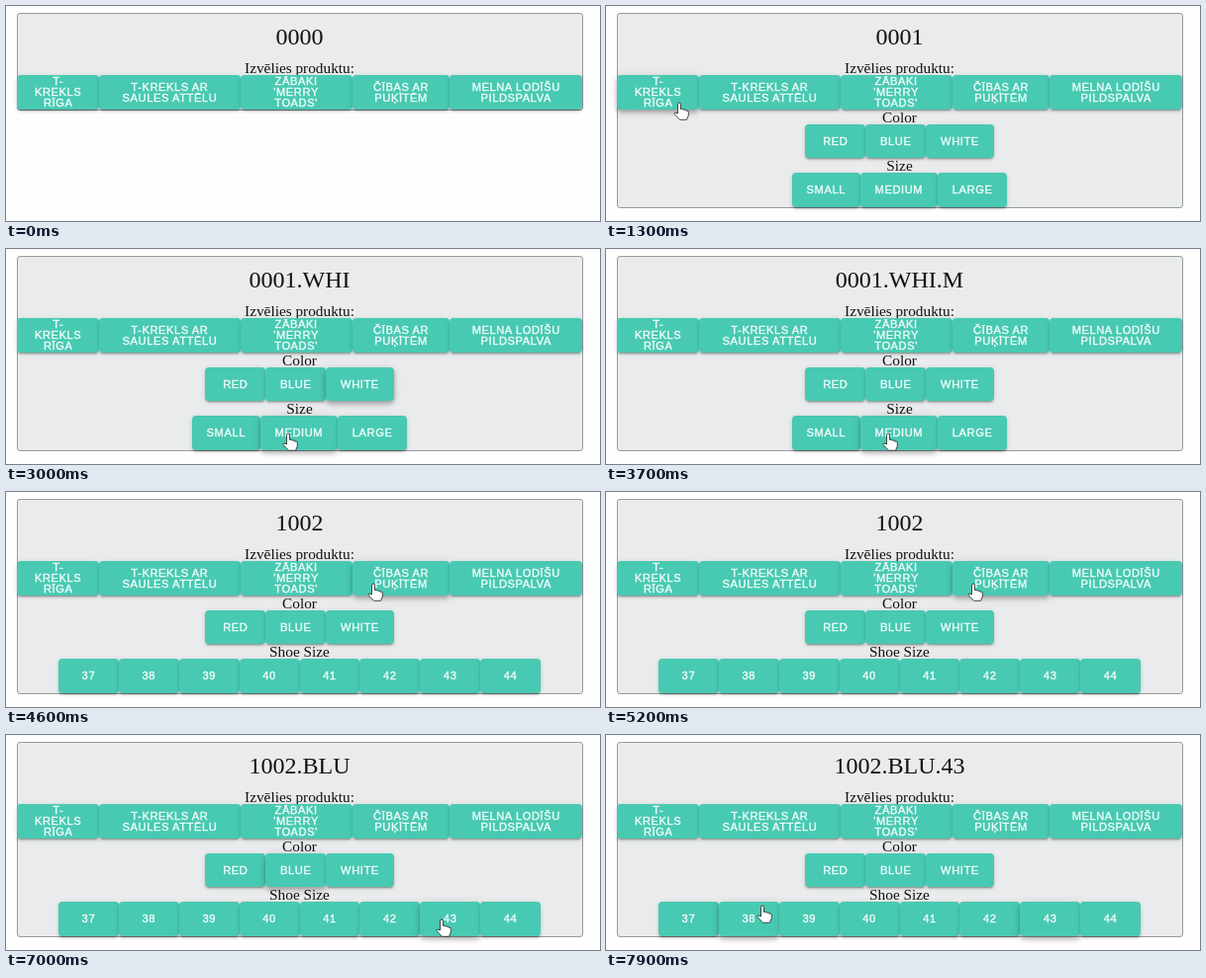
An HTML page for the animation above (8 s loop, 600 px wide and 218 px high).

```html
<!DOCTYPE html>
<html lang="lv">
<head>
<meta charset="utf-8">
<style>
html, body { margin: 0; width: 100%; height: 100%; overflow: hidden; background: #fefefe; }
#stage { position: relative; width: 600px; height: 218px; overflow: hidden; }
#panel, .label, .row, #cursor { position: absolute; box-sizing: border-box; }
#panel { left: 11px; top: 7px; width: 572px; background: #e9ebec; border: 1px solid #96999b; border-radius: 3px; }
.label, .row { left: 0; width: 593px; }
.label { text-align: center; color: #111; font: 15.3px/18px "Liberation Serif", serif; }
#code { top: 17px; font-size: 24px; line-height: 28px; }
.row { display: flex; justify-content: center; }
.btn {
  flex: none; display: flex; align-items: center; justify-content: center; box-sizing: border-box;
  height: 34.4px; min-width: 60.9px; padding: 0 14.8px; text-align: center;
  background: #48c9b2; color: #f0fcf9; border-radius: 4px;
  font: 11.1px/10.8px "Liberation Sans", Arial, sans-serif; letter-spacing: .6px; -webkit-text-stroke: .4px #f0fcf9;
  box-shadow: 0 3px 1px -2px #0003, 0 2px 2px #00000024, 0 1px 5px #0000001f;
}
.btn.up { box-shadow: 0 2px 4px -1px #0003, 0 4px 5px #00000024, 0 1px 10px #0000001f; }
#cursor { left: 0; top: 0; overflow: visible; fill: #fff; stroke: #333; stroke-width: .9; stroke-linejoin: round; }
</style>
</head>
<body>
<div id="stage">
  <div id="panel"></div>
  <div id="code" class="label"></div>
  <div class="label" style="top:54px">Izvēlies produktu:</div>
  <div id="colorLabel" class="label" style="top:104px">Color</div>
  <div id="sizeLabel" class="label" style="top:153px"></div>
  <svg id="cursor" width="1" height="1"><path id="shape"/></svg>
</div>
<script>
const LOOP = 8000, ROW_TOP = 70.4, ROW_STEP = 49.4;
const HAND = 'M-1.5 11V1.5a1.5 1.5 0 0 1 3 0V6.5q2.8-.8 2.8.7 2.7-.6 2.7 1 2.3-.6 2.3 1V13l-1.8 4.3h-7L-5 11.5q0-2.2 2-1.2z';
const ARROW = 'M0 0V15l3.5-3.3 2.3 5.3 2.3-1-2.3-5.1h4.8z';
const $ = id => document.getElementById(id);
const buttons = [];

// A centred row of buttons; each item is [text, code part, width if fixed]
function addRow(kind, line, items) {
  const row = document.createElement('div');
  row.className = 'row';
  row.style.top = ROW_TOP + line * ROW_STEP + 'px';
  $('stage').insertBefore(row, $('cursor'));
  for (const [text, part, width] of items) {
    const el = document.createElement('div');
    el.className = 'btn';
    el.textContent = text;
    if (width) el.style.width = width + 'px';
    row.append(el);
    buttons.push({ el, kind, part });
  }
}

addRow('product', 0, [
  ['T-KREKLS RĪGA', '0001', 83.3], ['T-KREKLS AR SAULES ATTĒLU', '0002', 142.2],
  ["ZĀBAKI 'MERRY TOADS'", '1001', 113.2], ['ČĪBAS AR PUĶĪTĒM', '1002', 98.8],
  ['MELNA LODĪŠU PILDSPALVA', '2001', 133.5]
]);
addRow('color', 1, ['RED', 'BLUE', 'WHITE'].map(s => [s, s.slice(0, 3)]));
addRow('size', 2, ['SMALL', 'MEDIUM', 'LARGE'].map(s => [s, s[0]]));
addRow('shoe', 2, Array.from({ length: 8 }, (_, i) => [37 + i, 37 + i]));
for (const b of buttons) b.box = b.el.getBoundingClientRect();

// Cursor moves: start, end, x, y, time of the click
const moves = [
  [0, 500, 120, 225],
  [500, 1000, 74, 98, 1100],
  [1500, 2100, 350, 137, 2400],
  [2600, 3000, 285, 187, 3300],
  [3800, 4400, 371, 93, 4600],
  [5300, 5800, 306, 139, 5900],
  [6300, 6800, 440, 187, 7100],
  [7400, 7650, 300, 207],
  [7650, 7900, 158, 173]
];

function cursorAt(t) {
  let x = 120, y = 225;
  for (const [start, end, toX, toY] of moves) {
    const u = Math.min(1, Math.max(0, (t - start) / (end - start)));
    const k = u * u * (3 - 2 * u);
    x += (toX - x) * k;
    y += (toY - y) * k;
  }
  return [x, y];
}

function isShown(b, order) {
  const sizes = order.product?.[0] === '1' ? 'shoe' : 'size';
  return b.kind === 'product' || !!order.product && (b.kind === 'color' || b.kind === sizes);
}

const hit = (x, y, order) => buttons.find(({ box, ...b }) =>
  isShown(b, order) && x >= box.left && x < box.right && y >= box.top && y < box.bottom)?.el;

function draw(t) {
  // Replay the clicks made so far
  let order = {}, focus;
  for (const [, , cx, cy, click] of moves) {
    if (!(click <= t)) continue;
    focus = hit(cx, cy, order);
    const { kind, part } = buttons.find(b => b.el === focus);
    order = kind === 'product' ? { product: part } : { ...order, [kind === 'color' ? 'color' : 'size']: part };
  }
  const { product, color, size } = order;
  const [x, y] = cursorAt(t), hover = hit(x, y, order);

  $('code').textContent = [product || '0000', color, size].filter(Boolean).join('.');
  $('panel').style.height = product ? '198px' : '99px';
  $('colorLabel').style.visibility = $('sizeLabel').style.visibility = product ? 'visible' : 'hidden';
  $('sizeLabel').textContent = product?.[0] === '1' ? 'Shoe Size' : 'Size';
  for (const b of buttons) {
    b.el.style.visibility = isShown(b, order) ? 'visible' : 'hidden';
    b.el.classList.toggle('up', b.el === hover || b.el === focus);
  }
  $('shape').setAttribute('d', hover ? HAND : ARROW);
  $('cursor').style.transform = `translate(${x}px,${y}px)`;
}

// The picture advances ten times a second
function tick() {
  draw(Math.floor(performance.now() % LOOP / 100) * 100);
  requestAnimationFrame(tick);
}
tick();
</script>
</body>
</html>
```
